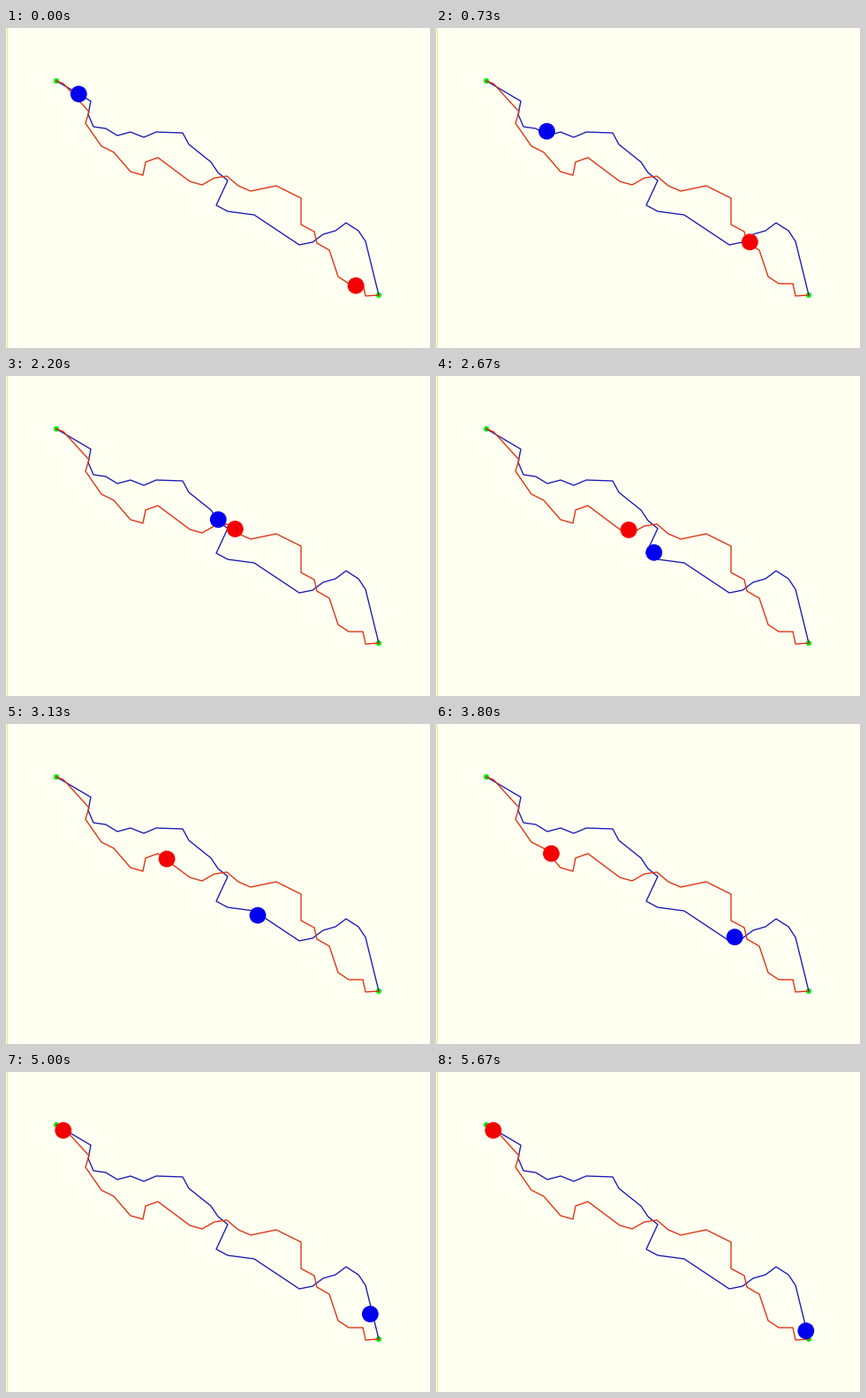
A matplotlib script that plays this animation: 480 by 363 pixels, repeating every 5740 ms.

```python
import numpy as np
import matplotlib.pyplot as plt
from matplotlib.animation import FuncAnimation
from matplotlib.patches import Circle

W, H, DPI = 480, 363, 100
LOOP, TICK = 5740, 10        # ms
POSE_TIME = 1000 / 15        # the robots move 15 times a second
SPEED = 6.0                  # px per pose
HEAD_START = 4.9             # poses already travelled when the loop begins
REACH = 10                   # a corner counts as passed within this distance
PX = 72 / DPI

# Corners of each route, in driving order
BLUE_ROUTE = [(57, 60), (96, 83), (93, 98), (99, 112), (113, 114), (126, 122),
              (141, 118), (156, 124), (170, 118), (200, 119), (207, 132),
              (232, 152), (240, 164), (251, 173), (238, 201), (251, 208),
              (281, 212), (332, 246), (347, 243), (359, 234), (373, 230),
              (385, 221), (399, 230), (407, 242), (422, 303)]
RED_ROUTE = [(422, 303), (407, 304), (404, 290), (388, 290), (376, 282),
             (366, 252), (352, 244), (349, 231), (334, 223), (334, 193),
             (306, 179), (277, 185), (263, 179), (250, 168), (236, 170),
             (222, 178), (208, 174), (172, 147), (158, 152), (155, 167),
             (141, 163), (122, 141), (108, 134), (90, 108), (94, 95),
             (65, 63), (57, 60)]


def drive(route, step=0.1):
    """Steer at each corner in turn, cutting it; one point per step px."""
    pos = np.array(route[0], float)
    trail = [pos.copy()]
    for goal in np.array(route[1:], float):
        while (gap := np.hypot(*(goal - pos))) > REACH:
            pos += (goal - pos) / gap * step
            trail.append(pos.copy())
    dist = np.arange(len(trail)) * step
    return lambda d: [np.interp(d, dist, c) for c in np.transpose(trail)]


fig = plt.figure(figsize=(W / DPI, H / DPI), dpi=DPI, facecolor="#fffff2")
ax = fig.add_axes([0, 0, 1, 1])
ax.set(xlim=(0, W), ylim=(H, 0))
ax.axis("off")


def line(points, color, width):
    ax.plot(*np.transpose(points), color=color, lw=width * PX,
            solid_joinstyle="round")


def disc(center, radius, color, z):
    return ax.add_patch(Circle(center, radius, fc=color, ec="none", zorder=z))


line([(0.5, 0), (0.5, H - 0.5), (W, H - 0.5)], "#e8e87a", 1)
for end in (BLUE_ROUTE[0], BLUE_ROUTE[-1]):
    disc(end, 3.2, "#10f010", 1.5)
line(BLUE_ROUTE, "#1a1ab8", 1.35)
line(RED_ROUTE, "#e2300a", 1.35)

robots = [(disc(route[0], 9.4, color, 5), drive(route))
          for route, color in ((BLUE_ROUTE, "#0000ee"), (RED_ROUTE, "#f40000"))]


def draw(i):
    pose = (i * TICK + 4) // POSE_TIME
    for ball, place in robots:
        ball.center = place(SPEED * (pose + HEAD_START))
    return [ball for ball, _ in robots]


anim = FuncAnimation(fig, draw, frames=LOOP // TICK, interval=TICK,
                     repeat=True, repeat_delay=0)
plt.show()
```
